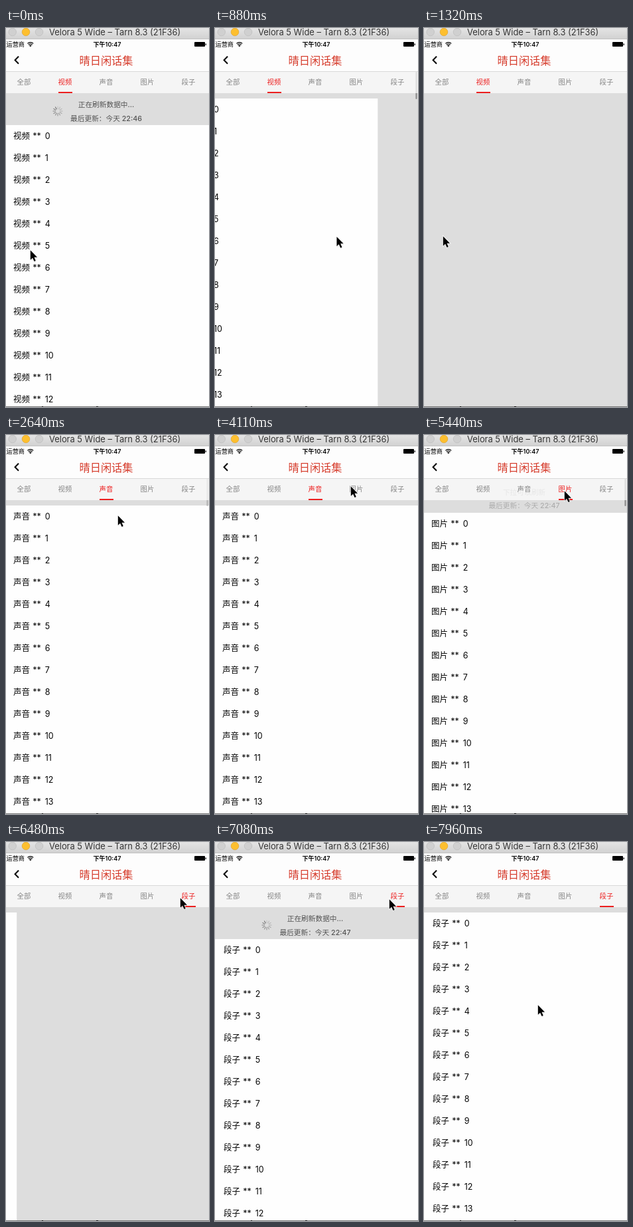
An HTML page that plays this animation: 306 by 570 pixels, repeating every 8 s.

```html
<!DOCTYPE html>
<html lang="zh-CN">
<head>
<meta charset="utf-8">
<title>Tabbed lists</title>
<style>
  html, body { margin: 0; width: 100%; height: 100%; overflow: hidden; background: #ddd; }
  svg { display: block; width: 306px; height: 570px; }
  text { font-family: Inter, "Noto Sans CJK SC", "Noto Sans CJK", sans-serif; white-space: pre; }
  .row { font-size: 12.5px; fill: #050505; }
  .tab { font-size: 10.4px; text-anchor: middle; fill: #858585; }
  .tab.on { fill: #ec1f1f; }
  .note { font-size: 10.7px; font-weight: 500; text-anchor: middle; fill: #545454; }
</style>
</head>
<body>
<svg viewBox="0 0 306 570" xmlns="http://www.w3.org/2000/svg">
  <defs>
    <linearGradient id="chrome" x2="0" y2="1">
      <stop stop-color="#e4e4e4"/><stop offset="1" stop-color="#d2d2d2"/>
    </linearGradient>
  </defs>
  <rect width="306" height="570" fill="#ddd"/>
  <g id="pages"></g>
  <rect id="thumb" x="302.5" y="66" width="2" height="41" rx="1" fill="#858585"/>

  <rect y="66" width="306" height="32" fill="#fff" fill-opacity=".7"/>
  <g id="tabs"></g>
  <rect id="line" y="96" width="21" height="2" fill="#ec1f1f"/>

  <rect y="16" width="306" height="49" fill="#fdfdfd"/>
  <rect y="65" width="306" height="1" fill="#d9d9d9"/>
  <path d="M19 42.7 13.6 48.2 19 53.7" fill="none" stroke="#000" stroke-width="2"/>
  <text x="151" y="54.6" font-size="16.2" font-weight="300" text-anchor="middle" fill="#d63c2c">晴日闲话集</text>

  <text x="0.5" y="28" font-size="9.2">运营商</text>
  <g fill="none" stroke="#000" stroke-width="1.3">
    <path d="M32.4 23.4a6.2 6.2 0 0 1 8.8 0M34 25.2a4 4 0 0 1 5.6 0"/>
  </g>
  <path d="M36.8 28.2 35 26.4a2.6 2.6 0 0 1 3.6 0z"/>
  <text x="152.5" y="28" font-size="9" font-weight="600" text-anchor="middle">下午10:47</text>
  <rect x="284" y="21" width="16" height="7" rx="1"/>
  <rect x="300.6" y="23.2" width="1.2" height="2.8" rx=".6"/>

  <rect width="306" height="16" fill="url(#chrome)"/>
  <rect y="16" width="306" height=".8" fill="#b4b4b4"/>
  <g stroke-width=".7">
    <circle cx="9.7" cy="6" r="5.8" fill="#d0d0d0" stroke="#bcbcbc"/>
    <circle cx="30" cy="6" r="5.8" fill="#fdbf2f" stroke="#e0a22c"/>
    <circle cx="50" cy="6" r="5.8" fill="#d0d0d0" stroke="#bcbcbc"/>
  </g>
  <text x="65" y="11" font-size="12.9" fill="#343434">Velora 5 Wide – Tarn 8.3 (21F36)</text>

  <rect y="569" width="306" height="1" fill="#777"/>
  <path d="M54 569h2v1h-2zM136 569h3v1h-3z"/>

  <g id="pointer">
    <path d="M0 0V14.4L3.3 11.4 5.7 16.7 8 15.7 5.7 10.4H10.2Z" transform="translate(1.4 1.4)" opacity=".22"/>
    <path d="M0 0V14.4L3.3 11.4 5.7 16.7 8 15.7 5.7 10.4H10.2Z" transform="translate(.8 .3)"
      stroke="#fff" stroke-width="1.6" paint-order="stroke"/>
  </g>
</svg>
<script>
const LOOP = 8000, BEAT = 147.3, WIDTH = 306;
const REST = 106, PULL = 40, CLOSE = 3.94, CLOSE_TIME = 2.7;
const $ = id => document.getElementById(id);

function add(parent, tag, attrs, content = '') {
  const el = document.createElementNS('http://www.w3.org/2000/svg', tag);
  for (const name in attrs) el.setAttribute(name, attrs[name]);
  el.textContent = content;
  return parent.appendChild(el);
}

const clamp = v => Math.min(1, Math.max(0, v));
const smooth = v => (v = clamp(v), v * v * (3 - 2 * v));

// All moments below are counted in beats.
const drag = { from: 4.8, time: 4.2, select: 9.2, load: 9.2 };
const tap = at => ({ from: at, time: 2.08, select: at, load: at + 2.08 });
const moves = [drag, tap(29.21), tap(42.21)];

const names = ['全部', '视频', '声音', '图片', '段子'];
const tabs = names.map((name, i) =>
  add($('tabs'), 'text', { class: 'tab', x: 27 + 62 * i, y: 85.3 }, name));

function makePage(index, load) {
  const root = add($('pages'), 'g', {});
  const body = add(root, 'g', {});
  const head = add(body, 'g', {});
  const state = add(head, 'text', { class: 'note', x: 151, y: -27 });
  const stamp = add(head, 'text', { class: 'note', x: 151, y: -6.5 });
  const spinner = add(head, 'g', {});
  const spokes = Array.from({ length: 12 }, (_, i) => add(spinner, 'path', {
    d: 'M0 -3.6V-7', stroke: '#666', 'stroke-width': 1.2, 'stroke-linecap': 'round',
    transform: `translate(78 -21) rotate(${i * 30})`
  }));
  add(body, 'rect', { width: WIDTH, height: 570, fill: '#fefefe' });
  const left = index === 4 ? 13 : 11;
  for (let i = 0; i < 14; i++) {
    const y = 20.8 + 33 * i;
    add(body, 'text', { class: 'row', x: left, y }, names[index]);
    add(body, 'text', { class: 'row', x: left + 29.3, y }, '**');
    add(body, 'text', { class: 'row', x: left + 47.7, y }, i);
  }
  return { index, load, root, body, head, state, stamp, spinner, spokes };
}

const pages = [makePage(1, -2), ...moves.map((m, i) => makePage(i + 2, m.load))];

function drawPage(page, beat, offset) {
  const age = beat - page.load;
  const x = (page.index - offset) * WIDTH;
  const shown = age >= 0 && Math.abs(x) < WIDTH;
  page.root.setAttribute('display', shown ? 'inline' : 'none');
  if (!shown) return;

  const closing = clamp((age - CLOSE) / CLOSE_TIME);
  const done = closing > 0;
  const pull = PULL * (smooth(age / 1.7) - smooth(closing));
  page.root.setAttribute('transform', `translate(${x} 0)`);
  page.body.setAttribute('transform', `translate(0 ${REST + pull})`);
  page.head.setAttribute('opacity', 1 - closing);
  page.state.textContent = done ? '下拉可以刷新' : '正在刷新数据中...';
  page.stamp.textContent = '最后更新：今天 22:' + (done || page.index > 1 ? 47 : 46);
  page.spinner.setAttribute('display', done ? 'none' : 'inline');
  const turn = Math.floor(beat * BEAT * 12 / 1000);
  page.spokes.forEach((s, i) =>
    s.setAttribute('opacity', 0.2 + 0.65 * ((i - turn + 1200) % 12) / 11));
}

// beat, x, y
const track = [
  [0, 36, 334], [2, 130, 322], [4, 262, 314], [5, 258, 314], [8, 32, 313], [9, 28, 313],
  [11, 40, 300], [14, 130, 205], [16, 168, 156], [18, 168, 121], [20, 206, 78],
  [21, 206, 78], [24, 238, 126], [25, 235, 120], [28, 204, 77], [30, 206, 80],
  [32, 211, 84], [37, 211, 84], [41, 262, 86], [42, 262, 86], [44, 262, 84],
  [48, 262, 86], [50, 246, 112], [53, 178, 230], [54, 171, 245], [55, 171, 245]
];

function pointerAt(beat) {
  const i = Math.max(1, track.findIndex(p => p[0] >= beat));
  const [a, b] = [track[i - 1], track[i]];
  const p = (beat - a[0]) / (b[0] - a[0]);
  return [a[1] + (b[1] - a[1]) * p, a[2] + (b[2] - a[2]) * p];
}

function draw(ms) {
  // The screen refreshes once per beat.
  const beat = Math.floor((ms % LOOP + 16) / BEAT);
  const sum = fn => moves.reduce((total, m) => total + fn(m), 1);
  const offset = sum(m => smooth((beat - m.from) / m.time));
  const under = sum(m => smooth((beat - m.select) / 1.7));
  const current = sum(m => beat >= m.select ? 1 : 0);

  pages.forEach(page => drawPage(page, beat, offset));
  tabs.forEach((tab, i) => tab.classList.toggle('on', i === current));
  $('line').setAttribute('x', 17 + 62 * under);

  const age = beat - pages[current - 1].load;
  $('thumb').setAttribute('opacity', age < 4 ? 0 : clamp((9.6 - age) / 1.6));
  $('pointer').setAttribute('transform', `translate(${pointerAt(beat)})`);
}

const start = performance.now();
function tick() {
  draw(performance.now() - start);
  requestAnimationFrame(tick);
}
tick();
</script>
</body>
</html>
```
